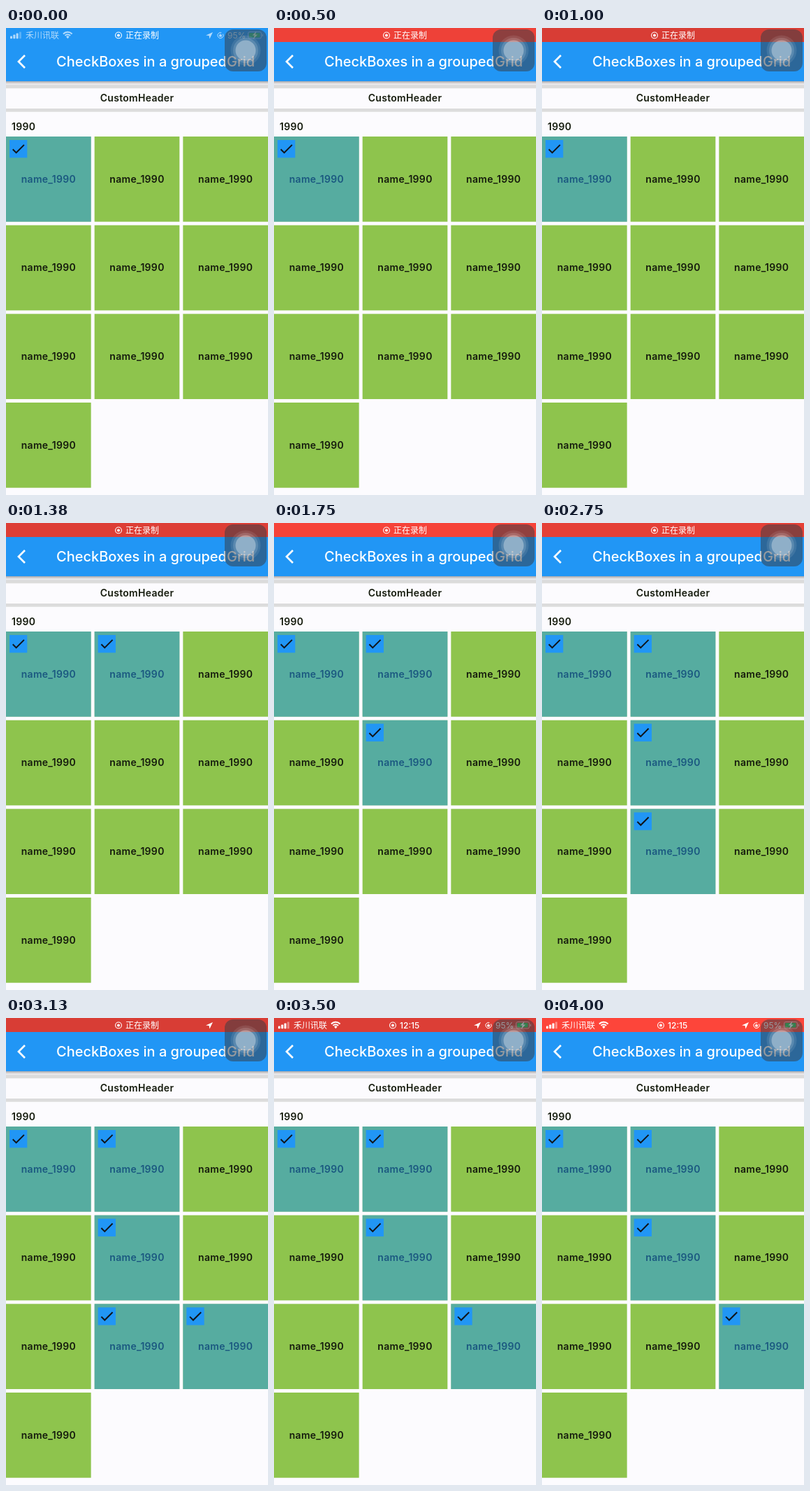
These frames come from a looping animation (375x667 px, 4.12 s). An HTML page with a canvas:

```html
<!DOCTYPE html>
<html lang="zh">
<head>
<meta charset="utf-8">
<title>Grouped grid</title>
<style>
  html, body { margin: 0; width: 100%; height: 100%; overflow: hidden; background: #fcfbfe; }
  canvas { display: block; width: 375px; height: 667px; }
</style>
</head>
<body>
<canvas id="stage"></canvas>
<script>
const WIDTH = 375, HEIGHT = 667, LOOP = 4120, STEP = 125;
const BLUE = '#2196f5', WHITE = '#fff', INK = '#151b0d';
const SANS = 'Inter, "Noto Sans CJK SC", "Noto Sans CJK", sans-serif';
const HAN = '"Noto Sans CJK SC", "Noto Sans CJK", sans-serif';
const TILE = 121.67, PITCH = 126.67, GRID_TOP = 155;
const CHECK = new Path2D('M9 16.17 4.83 12 3.41 13.41 9 19 21 7 19.59 5.59z');
const ARROW = new Path2D('M296 6 286 10.4 290.6 11 291.4 15.6z');
const BOLT = new Path2D('M358.5 4.5 352.5 10.6H355.6L353.8 16 360 9.4H356.8z');

// Tile index: [time checked, time unchecked]
const selection = {
  0: [0, Infinity],
  1: [1375, Infinity],
  4: [1625, Infinity],
  7: [2250, 3500],
  8: [2875, Infinity]
};

const canvas = document.getElementById('stage');
const ctx = canvas.getContext('2d');
const ratio = window.devicePixelRatio || 1;
canvas.width = WIDTH * ratio;
canvas.height = HEIGHT * ratio;

const clamp = v => Math.max(0, Math.min(1, v));
const mix = (a, b, k) => a.map((v, i) => Math.round(v + (b[i] - v) * k));
const rgb = c => `rgb(${c.join(',')})`;

function rect(x, y, w, h, color) {
  ctx.fillStyle = color;
  ctx.fillRect(x, y, w, h);
}

function roundRect(x, y, w, h, r, color) {
  ctx.fillStyle = color;
  ctx.beginPath();
  ctx.roundRect(x, y, w, h, r);
  ctx.fill();
}

function disc(x, y, r, color) {
  ctx.fillStyle = color;
  ctx.beginPath();
  ctx.arc(x, y, r, 0, Math.PI * 2);
  ctx.fill();
}

function arc(x, y, r, from, to, width) {
  ctx.strokeStyle = WHITE;
  ctx.lineWidth = width;
  ctx.beginPath();
  ctx.arc(x, y, r, from, to);
  ctx.stroke();
}

function text(str, x, y, font, color, align = 'left', spacing = 0) {
  ctx.font = font;
  ctx.fillStyle = color;
  ctx.textAlign = align;
  ctx.letterSpacing = spacing + 'px';
  ctx.fillText(str, x, y);
}

function label(str, x, y, align = 'center') {
  text(str, x, y, `600 14px ${SANS}`, INK, align, 0.3);
}

function drawTile(index, t) {
  const x = index % 3 * PITCH, y = GRID_TOP + Math.floor(index / 3) * PITCH;
  rect(x, y, TILE, TILE, '#8ec44d');
  label('name_1990', x + TILE / 2, y + 65.5);
  const [on, off] = selection[index] || [Infinity, Infinity];
  if (t < on || t >= off) return;
  rect(x, y, TILE, TILE, 'rgba(33,150,243,.5)');
  rect(x + 5, y + 5, 25.3, 25.3, BLUE);
  ctx.save();
  ctx.translate(x + 5.6, y + 5.6);
  ctx.fillStyle = '#101418';
  ctx.fill(CHECK);
  ctx.restore();
}

function drawBody(t) {
  rect(0, 0, WIDTH, HEIGHT, '#fcfbfe');
  for (const y of [81.5, 115]) rect(0, y, WIDTH, 4.7, '#dcdcdc');
  label('CustomHeader', 187.5, 105);
  label('1990', 8, 146, 'left');
  for (let i = 0; i < 10; i++) drawTile(i, t);
}

function drawAppBar() {
  const shade = ctx.createLinearGradient(0, 76, 0, 83);
  shade.addColorStop(0, 'rgba(0,0,0,.33)');
  shade.addColorStop(0.5, 'rgba(0,0,0,.1)');
  shade.addColorStop(1, 'rgba(0,0,0,0)');
  rect(0, 76, WIDTH, 7, shade);
  rect(0, 0, WIDTH, 76, BLUE);
  ctx.strokeStyle = WHITE;
  ctx.lineWidth = 2.7;
  ctx.beginPath();
  ctx.moveTo(27, 39);
  ctx.lineTo(18, 48);
  ctx.lineTo(27, 57);
  ctx.stroke();
  text('CheckBoxes in a groupedGrid', 72, 55, `500 20px ${SANS}`, WHITE);
}

function drawSignal() {
  for (let i = 0; i < 4; i++) {
    roundRect(6 + i * 4.3, 11.5 - i * 2, 3, 3.8 + i * 2, 0.7,
      i < 3 ? WHITE : 'rgba(255,255,255,.4)');
  }
  text('禾川讯联', 28, 14.8, `400 12px ${HAN}`, WHITE);
  for (const r of [5.2, 8.7]) arc(88.3, 14.5, r, -Math.PI * 0.76, -Math.PI * 0.24, 2);
  ctx.fillStyle = WHITE;
  ctx.beginPath();
  ctx.moveTo(88.3, 15.3);
  ctx.arc(88.3, 14.5, 3, -Math.PI * 0.76, -Math.PI * 0.24);
  ctx.fill();
}

function drawBattery() {
  arc(307, 10.5, 4.1, -0.5, Math.PI * 1.6, 1);
  roundRect(305.2, 9.8, 3.6, 2.8, 0.5, WHITE);
  arc(307, 9.7, 1.1, Math.PI, 0, 0.8);
  text('95%', 317, 14.7, `400 12px ${SANS}`, WHITE);
  ctx.strokeStyle = 'rgba(255,255,255,.6)';
  ctx.lineWidth = 1;
  ctx.beginPath();
  ctx.roundRect(346.5, 5.5, 19, 9.5, 2.5);
  ctx.stroke();
  roundRect(348, 7, 15.5, 6.5, 1.2, '#35c759');
  roundRect(366.7, 8.5, 1.3, 3.5, 0.6, 'rgba(255,255,255,.6)');
  ctx.fillStyle = WHITE;
  ctx.fill(BOLT);
}

function drawStatus(t) {
  const pulse = clamp(0.5 - 0.62 * Math.cos((t - 1065) / 2130 * Math.PI * 2));
  ctx.globalAlpha = clamp(t / 375);
  rect(0, 0, WIDTH, 20, rgb(mix([216, 61, 53], [255, 69, 58], pulse)));

  const leaving = 0.65 * clamp(1 - t / 375);
  const arriving = clamp((t - 3125) / 250);
  const shown = Math.max(leaving, arriving);
  ctx.globalAlpha = shown;
  if (shown > 0) {
    drawSignal();
    drawBattery();
  }
  ctx.globalAlpha = t >= 3125 ? 1 : leaving;
  ctx.fillStyle = WHITE;
  ctx.fill(ARROW);

  ctx.globalAlpha = 1;
  const clock = t >= 3375;
  const x = clock ? 170 : 161;
  arc(x, 10.4, 4.4, 0, Math.PI * 2, 1.1);
  disc(x, 10.4, 2, WHITE);
  if (clock) text('12:15', 180, 14.7, `500 12px ${SANS}`, WHITE);
  else text('正在录制', 171, 14.8, `400 12px ${HAN}`, WHITE);
}

function drawTouchButton() {
  roundRect(313, 2, 60, 60, 12, 'rgba(55,62,70,.52)');
  disc(343, 32, 21.5, 'rgba(255,255,255,.09)');
  disc(343, 32, 18, 'rgba(255,255,255,.14)');
  disc(343, 32, 14.5, 'rgba(255,255,255,.32)');
}

function render(now) {
  const t = Math.floor(now % LOOP / STEP) * STEP;
  ctx.setTransform(ratio, 0, 0, ratio, 0, 0);
  drawBody(t);
  drawAppBar();
  drawStatus(t);
  drawTouchButton();
}

const start = performance.now();
function tick() {
  render(performance.now() - start);
  requestAnimationFrame(tick);
}
tick();
</script>
</body>
</html>
```
